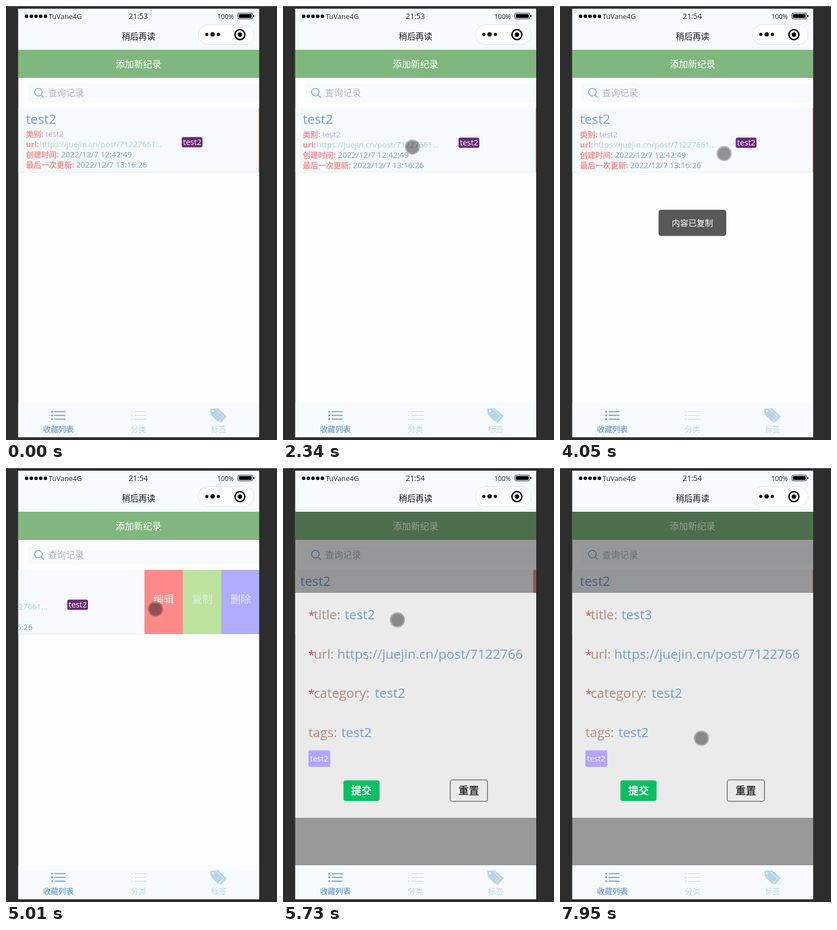
An HTML page that plays this animation: 502 by 803 pixels, repeating every 8000 ms.

```html
<!DOCTYPE html>
<html lang="zh">
<head>
<meta charset="utf-8">
<title>稍后再读</title>
<style>
html, body { margin: 0; width: 100%; height: 100%; overflow: hidden; background: #2d2d2d; }
svg { display: block; }
text { font-family: "Open Sans", "Noto Sans", "Noto Sans CJK SC", "Noto Sans CJK", sans-serif; white-space: pre; }
.mid { text-anchor: middle; }
.med { font-weight: 500; }
.bold { font-weight: 700; }
</style>
</head>
<body>
<svg id="stage" width="502" height="803" viewBox="0 0 502 803"></svg>
<script>
const LOOP = 8000;
const LEFT = 22.5, RIGHT = 469, WIDE = RIGHT - LEFT, MID = 245.5;
const BLUE = '#729fd3', PALE = '#b9d6e8', PINK = '#ff8e8e', BROWN = '#b38c78', PANEL = '#f7fbfd';

const text = (x, y, size, fill, str, cls = '', id = '') =>
  `<text x="${x}" y="${y}" font-size="${size}" fill="${fill}" class="${cls}" id="${id}">${str}</text>`;
const rect = (x, y, w, h, fill, rx = 0, more = '') =>
  `<rect x="${x}" y="${y}" width="${w}" height="${h}" rx="${rx}" fill="${fill}" ${more}/>`;
const dot = (x, y, r, fill, more = '') =>
  `<circle cx="${x}" cy="${y}" r="${r}" fill="${fill}" ${more}/>`;
const band = (y, h, fill, more) => rect(LEFT, y, WIDE, h, fill, 0, more);
const repeat = (n, make) => Array.from({ length: n }, (_, i) => make(i)).join('');

function statusBar() {
  return band(5, 76, PANEL) +
    repeat(5, i => dot(38.2 + i * 8.7, 19, 3.3, '#000')) +
    text(79, 23.5, 13, '#222', 'TuVane4G') +
    text(245, 24, 14, '#222', '21:53', 'mid', 'clock') +
    text(391.5, 24, 12, '#222', '100%') +
    rect(429.7, 13.2, 27, 10.6, 'none', 2.5, 'stroke="#111"') +
    rect(431.5, 15, 23.4, 7, '#000', 1) + rect(458, 16.5, 2, 4, '#111', 1) +
    text(MID, 62, 15.5, '#111', '稍后再读', 'mid') +
    rect(356.5, 34.5, 103, 37, '#fff', 18.5, 'stroke="#dfe3e4"') +
    repeat(3, i => dot(372 + i * 10.7, 52.5, i === 1 ? 4 : 2.9, '#000')) +
    dot(433.3, 53, 9.2, 'none', 'stroke="#000" stroke-width="2.6"') + dot(433.3, 53, 4.2, '#000');
}

function searchArea() {
  return band(81, 52, '#80b77f') +
    text(MID, 114, 16.9, '#fff', '添加新纪录', 'mid') +
    rect(40, 143, 429, 35, '#f8fbfc') +
    `<g fill="none" stroke="#7ba4d2" stroke-width="1.6"><circle cx="60" cy="159.5" r="7"/><path d="M65 165l5 4.5"/></g>` +
    text(78, 167, 16.6, '#adb5b8', '查询记录');
}

function card() {
  const row = (i, label, x, color, value) =>
    text(37, 242 + i * 19, 14.2, PINK, label, 'bold') + text(x, 242 + i * 19, 14.65, color, value, 'med');
  const action = (i, color, label) =>
    rect(468.5 + i * 71.2, 188.5, 71.4, 118.5, color) +
    text(504.3 + i * 71.2, 249.5, 19.2, '#ece9ea', label, 'mid');
  return band(188.5, 118.5, '#f6fafc') + band(307, 1, '#e2eaec') +
    '<g id="cell">' + text(37, 218, 24.2, BLUE, 'test2', 'med') + '<g id="rows">' +
    row(0, '类别:', 73, '#b3aaff', 'test2') +
    row(1, 'url:', 62.5, '#a5d8c6', 'https://juejin.cn/post/71227661...') +
    row(2, '创建时间:', 102, BLUE, '2022/12/7 12:42:49') +
    row(3, '最后一次更新:', 130, BLUE, '2022/12/7 13:16:26') +
    rect(325.5, 242.5, 38.5, 19, '#6b2a77', 3.5) + text(345, 257, 14.6, '#fff', 'test2', 'mid med') +
    '</g>' + action(0, '#ff8888', '编辑') + action(1, '#bce29e', '复制') + action(2, '#b0adff', '删除') +
    '</g>';
}

function popup() {
  const field = (i, label, x, value, star, id = '') => {
    const y = 280 + i * 72.7;
    return (star ? text(47, y, 21, '#f0405c', '*') : '') +
      text(star ? 57 : 47, y, 24.2, BROWN, label, 'med') + text(x, y, 24.4, BLUE, value, 'med', id);
  };
  return '<g id="popup">' + band(81, 654, '#000', 'opacity=".4"') + band(231, 416, '#ebebeb') +
    field(0, 'title:', 114, 'test2', true, 'name') +
    rect(170, 258, 1.2, 26, BLUE, 0, 'id="caret"') +
    `<svg width="445" height="803">${field(1, 'url:', 100.5, 'https://juejin.cn/post/7122766', true)}</svg>` +
    field(2, 'category:', 170, 'test2', true) +
    field(3, 'tags:', 108, 'test2', false) +
    rect(47, 522.5, 40.5, 30.5, '#b0a5ff', 3) + text(67.2, 543, 14.6, '#fff', 'test2', 'mid') +
    rect(112, 578, 66.8, 38, '#07c160', 4) + text(145.4, 604.3, 19.2, '#fff', '提交', 'mid bold') +
    rect(309.7, 577.2, 69, 39.5, 'none', 4, 'stroke="#555" stroke-width="1.3"') +
    text(344.3, 604.3, 19.2, '#333', '重置', 'mid bold') + '</g>';
}

function tabBar() {
  const list = (x, w, color, sw) => repeat(3, i => {
    const y = 750.5 + i * 7;
    return dot(x, y, sw, color) +
      `<path d="M${x + 5} ${y}H${x + w}" stroke="${color}" stroke-width="${sw}" stroke-linecap="round"/>`;
  });
  return band(735, 63, PANEL) + list(85.5, 24, BLUE, 1.8) + list(233, 27, PALE, 1.1) +
    `<path d="M385 744h7l17 15-11 12-4-2 9-10z" fill="${PALE}"/>` +
    `<path d="M378 745l10-1 15 15-10 11-14-14z" fill="${PALE}" stroke="${PANEL}" stroke-width=".8"/>` +
    dot(383.5, 749.5, 1.7, PANEL) +
    text(97, 787.5, 14.2, '#7faad7', '收藏列表', 'mid bold') +
    text(245.5, 787.5, 14.2, PALE, '分类', 'mid med') + text(394, 787.5, 14.2, PALE, '标签', 'mid med');
}

document.getElementById('stage').innerHTML =
  rect(0, 0, 502, 803, '#2d2d2d') + rect(0, 0, 502, 1, '#6a6a6a') +
  `<clipPath id="phone">${band(5, 793, '#000')}</clipPath>` +
  '<g clip-path="url(#phone)">' + band(5, 793, '#fefefe') +
  statusBar() + searchArea() + card() + rect(468, 189, 1, 118, PINK, 0, 'id="edge"') +
  '<g id="toast">' + rect(182.5, 377, 125.5, 48.5, '#585858', 5) +
  text(245.3, 406.8, 15.3, '#fff', '内容已复制', 'mid') + '</g>' +
  popup() + tabBar() + '</g>' +
  '<g id="touch">' + dot(0, 0, 14, '#000', 'opacity=".27"') + dot(0, 0, 11.5, '#000', 'opacity=".2"') + '</g>';

const el = {};
for (const id of ['clock', 'cell', 'rows', 'edge', 'toast', 'popup', 'name', 'caret', 'touch'])
  el[id] = document.getElementById(id);

const ramp = (t, from, length) => Math.min(1, Math.max(0, (t - from) / length));

// cubic-bezier(.18, .89, .32, 1)
function settle(x) {
  const curve = (s, a, b) => 3 * (1 - s) * (1 - s) * s * a + 3 * (1 - s) * s * s * b + s * s * s;
  let lo = 0, hi = 1;
  for (let i = 0; i < 24; i++) {
    const mid = (lo + hi) / 2;
    if (curve(mid, .18, .32) < x) lo = mid; else hi = mid;
  }
  return curve(hi, .89, 1);
}

// The finger drags 100px in 300ms, the cell springs open and later closes
function swipe(t, from, close) {
  const open = 100 * ramp(t, from, 300) + 113.5 * settle(ramp(t, from + 300, 600));
  return -open * (1 - settle(ramp(t, close, 600)));
}

// Touch path: time, x, y
const PATH = [
  [1790, 440, 14], [2340, 240, 261], [2640, 140, 262], [3180, 354, 278], [3280, 354, 278],
  [4050, 304, 273], [4292, 304, 273], [4592, 204, 268], [5010, 277, 261], [5358, 277, 261],
  [5730, 212, 281], [7280, 188, 275], [7950, 262, 500]];

function touchAt(t) {
  const i = PATH.findIndex(k => k[0] > t);
  if (i < 1) return (i ? PATH[PATH.length - 1] : PATH[0]).slice(1);
  const [t0, x0, y0] = PATH[i - 1], [t1, x1, y1] = PATH[i];
  const p = ramp(t, t0, t1 - t0);
  return [x0 + (x1 - x0) * p, y0 + (y1 - y0) * p];
}

const show = (node, on) => node.setAttribute('visibility', on ? 'visible' : 'hidden');
const move = (node, x, y) => node.setAttribute('transform', `translate(${x.toFixed(2)} ${y.toFixed(2)})`);

function draw(t) {
  const slide = swipe(t, 2340, 3250) + swipe(t, 4292, 5358);
  const fade = ramp(t, 5358, 300);
  move(el.cell, slide, 0);
  move(el.rows, 0, t < 1790 ? 0 : 1);
  move(el.touch, ...touchAt(t));
  show(el.touch, t >= 1790);
  show(el.edge, slide > -1);
  show(el.toast, t >= 3330 && t < 4860);
  show(el.popup, fade > 0);
  el.popup.setAttribute('opacity', fade);
  const erased = t >= 6850 && t < 6970;
  el.caret.setAttribute('opacity', t >= 6550 && t < 7400 ? 1 : 0);
  el.caret.setAttribute('x', erased ? 157 : 170);
  el.name.textContent = erased ? 'test' : t < 6850 ? 'test2' : 'test3';
  el.clock.textContent = t < 2940 ? '21:53' : '21:54';
}

const start = performance.now();
function loop(now) {
  draw(Math.max(0, now - start) % LOOP);
  requestAnimationFrame(loop);
}
draw(0);
requestAnimationFrame(loop);
</script>
</body>
</html>
```
